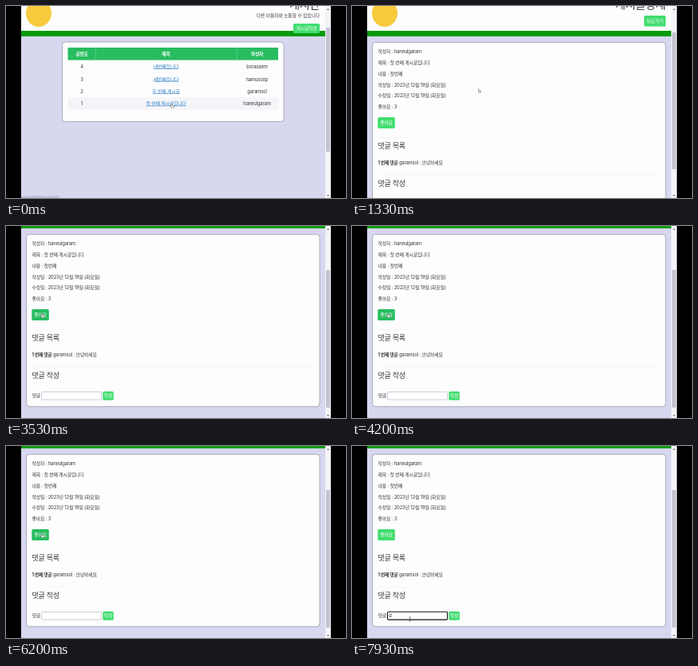
An HTML page with a canvas for the animation above (8 s loop, 426x240 px).

```html
<!DOCTYPE html>
<html lang="ko">
<head>
<meta charset="utf-8">
<style>
html, body { margin: 0; width: 100%; height: 100%; overflow: hidden; background: #000; }
canvas { display: block; width: 100vw; height: 100vh; }
</style>
</head>
<body>
<canvas id="stage"></canvas>
<script>
const canvas = document.getElementById('stage');
const ctx = canvas.getContext('2d');
const W = 426, H = 240, LOOP = 8000;
const OPEN_AT = 670, SCROLL_AT = 1730, FOCUS_AT = 7270, TYPE_AT = 7800;
const FONT = 'Inter, "Noto Sans CJK KR", "Noto Sans CJK", "Noto Sans CJK JP", sans-serif';
const INK = '#38383d', LAVENDER = '#d7d7ef', GREEN = '#069b0b';
const LIGHT = '#42dd70', DARK = '#28bd60';

// time, x, y
const path = [
  [0, 207, 122], [700, 207, 122], [1330, 158.5, 103.5], [1800, 140, 102],
  [2550, 73.5, 97.5], [2700, 73.5, 97.5], [3200, 44.5, 109.5],
  [6350, 44.5, 109.5], [7100, 72.5, 216], [8000, 72.5, 216]
];

const clamp = v => Math.max(0, Math.min(1, v));
const ease = v => v * v * (3 - 2 * v);

function pointer(t) {
  const i = path.findIndex((p, n) => n > 0 && t <= p[0]);
  const [t0, x0, y0] = path[i - 1], [t1, x1, y1] = path[i];
  const k = ease((t - t0) / (t1 - t0));
  return [x0 + (x1 - x0) * k, y0 + (y1 - y0) * k];
}

function rect(x, y, w, h, color) {
  ctx.fillStyle = color;
  ctx.fillRect(x, y, w, h);
}

function box(x, y, w, h, r, fill, stroke, width = 0.7) {
  ctx.beginPath();
  ctx.roundRect(x, y, w, h, r);
  ctx.fillStyle = fill;
  ctx.fill();
  if (stroke) {
    ctx.strokeStyle = stroke;
    ctx.lineWidth = width;
    ctx.stroke();
  }
}

function text(str, x, y, { size = 5.9, color = INK, align = 'left', weight = 400 } = {}) {
  ctx.font = `${weight} ${size}px ${FONT}`;
  ctx.letterSpacing = `${-0.03 * size}px`;
  ctx.textAlign = align;
  ctx.textBaseline = 'alphabetic';
  ctx.fillStyle = color;
  ctx.fillText(str, x, y + size * 0.36);
  return ctx.measureText(str).width;
}

function button(label, x, y, w, h, fill = LIGHT) {
  box(x, y, w, h, 1.6, fill);
  text(label, x + w / 2, y + h / 2, { color: '#fff', align: 'center', size: 5.9 });
}

function link(str, x, y) {
  const w = text(str, x, y, { color: '#2f7fc4', align: 'center' });
  rect(x - w / 2, y + 2.4, w, 0.6, '#2f7fc4');
}

function header(title) {
  rect(19, 0, 381, H, LAVENDER);
  rect(19, 0, 381, 31, '#fdfdfe');
  rect(19, 31, 381, 7, GREEN);
  ctx.beginPath();
  ctx.ellipse(41, 9, 16, 17, 0, 0, Math.PI * 2);
  ctx.fillStyle = '#f7cb3d';
  ctx.fill();
  text(title, 393, -1.7, { size: 14.2, align: 'right' });
}

function scrollbar(top, bottom) {
  rect(400, 0, 7, H, '#f3f3f8');
  rect(401, top, 5, bottom - top, '#c3c4cf');
  ctx.fillStyle = '#777';
  for (const [y, d] of [[4, -1], [237, 1]]) {
    ctx.beginPath();
    ctx.moveTo(402, y - d);
    ctx.lineTo(405, y - d);
    ctx.lineTo(403.5, y + d);
    ctx.fill();
  }
}

function listPage() {
  header('게시판');
  text('다른 이용자와 소통할 수 있습니다', 393, 12, { align: 'right' });
  button('게시글작성', 360, 22, 33, 12);
  box(70.5, 45, 277.5, 99.5, 4, '#fdfdfe', '#9696a0');

  rect(77.5, 52, 263.5, 15.6, DARK);
  rect(112, 52, 0.5, 15.6, '#75d697');
  rect(289, 52, 0.5, 15.6, '#75d697');
  const head = { color: '#fff', align: 'center', weight: 700 };
  text('글번호', 95, 60, head);
  text('제목', 200.5, 60, head);
  text('작성자', 314.5, 60, head);

  const rows = [
    ['네번째입니다', 'borasaem'],
    ['세번째입니다', 'namusoop'],
    ['두 번째 게시글', 'garamsol'],
    ['첫 번째 게시글입니다', 'haneulgaram']
  ];
  rows.forEach(([title, writer], i) => {
    const y = 76 + i * 15.4;
    if (i === 3) rect(77.5, y - 7.5, 263.5, 15, '#f5f5f9');
    text(4 - i, 95, y, { align: 'center' });
    link(title, 200.5, y);
    text(writer, 314.5, y, { align: 'center' });
    rect(77.5, y + 7.5, 263.5, 0.4, '#f0f0f4');
  });
  scrollbar(27, 182);
}

function detailPage(t) {
  const k = ease(clamp((t - SCROLL_AT) / 350));
  const hover = t > 3050 && t < 6500;
  const focus = t >= FOCUS_AT;
  rect(19, 0, 381, H, LAVENDER);
  ctx.save();
  ctx.translate(0, -35 * k);
  header('게시글상세');
  rect(19, 38, 381, 240, LAVENDER);
  button('뒤로가기', 366, 12, 27, 13.5);
  box(25.5, 45.3, 367.5, 215.5, 4, '#fdfdfe', '#8f8f9c');

  const info = [
    '작성자 : haneulgaram', '제목 : 첫 번째 게시글입니다', '내용 : 첫번째',
    '작성일 : 2023년 12월 19일 (화요일)', '수정일 : 2023년 12월 19일 (화요일)', '좋아요 : 3'
  ];
  info.forEach((line, i) => text(line, 32.5, 56.7 + i * 13.9));
  button('좋아요', 32.3, 139, 21.5, 14, hover ? DARK : LIGHT);

  rect(32.5, 164, 353, 0.4, '#ececf0');
  text('댓글 목록', 32.5, 174.5, { size: 9 });
  const w = text('1 번째 댓글', 32.5, 196, { weight: 700, size: 5.7 });
  text('garamsol : 안녕하세요', 34 + w, 196);
  rect(32.5, 211.3, 353, 0.4, '#ececf0');
  text('댓글 작성', 32.5, 221.5, { size: 9 });

  text('댓글', 32.5, 247);
  box(44.5, 242.3, 75, 9.8, 1.2, '#fff', focus ? '#111' : '#b4b5c6', focus ? 1.1 : 0.7);
  if (t >= TYPE_AT) text('d', 46, 247, { size: 6.2 });
  if (focus && Math.floor((t - FOCUS_AT) / 500) % 2 === 0) {
    rect(t >= TYPE_AT ? 50 : 46.2, 244.3, 0.5, 6, INK);
  }
  button('작성', 121.3, 241.8, 13.5, 11);
  ctx.restore();
  scrollbar(33 + 22 * k, 204 + 23 * k);
}

function shape(x, y, points) {
  ctx.beginPath();
  points.forEach(([px, py]) => ctx.lineTo(x + px, y + py));
  ctx.closePath();
  ctx.fillStyle = '#fff';
  ctx.strokeStyle = '#55555c';
  ctx.lineWidth = 0.5;
  ctx.fill();
  ctx.stroke();
}

function cursor(t) {
  const [x, y] = pointer(t);
  const onLink = t < OPEN_AT || (t > 3050 && t < 6500);
  if (onLink) {
    shape(x, y, [[0, 0], [1, 0], [1, 2], [3.4, 2.6], [3.2, 5], [0.4, 5], [-1.2, 2.8], [0, 3]]);
  } else if (t > 7050) {
    rect(x, y - 2, 0.6, 5, INK);
    rect(x - 1, y - 2.3, 2.6, 0.5, INK);
    rect(x - 1, y + 2.7, 2.6, 0.5, INK);
  } else {
    shape(x, y, [[0, 0], [0, 4.4], [1.1, 3.5], [1.9, 5], [2.6, 4.7], [1.9, 3.2], [3.2, 3.1]]);
  }
}

function draw(t) {
  const scale = window.devicePixelRatio || 1;
  const w = Math.round(innerWidth * scale), h = Math.round(innerHeight * scale);
  if (canvas.width !== w || canvas.height !== h) {
    canvas.width = w;
    canvas.height = h;
  }
  ctx.setTransform(w / W, 0, 0, h / H, 0, 0);
  rect(0, 0, W, H, '#000');
  ctx.save();
  ctx.beginPath();
  ctx.rect(19, 0, 388, H);
  ctx.clip();
  if (t < OPEN_AT) {
    listPage();
    text('localhost:8080/board/detail/1', 20, 238.5, { size: 3.6, color: '#8b8b9c' });
  } else {
    detailPage(t);
  }
  cursor(t);
  ctx.restore();
}

const start = performance.now();
function tick() {
  draw((performance.now() - start) % LOOP);
  requestAnimationFrame(tick);
}
tick();
</script>
</body>
</html>
```
